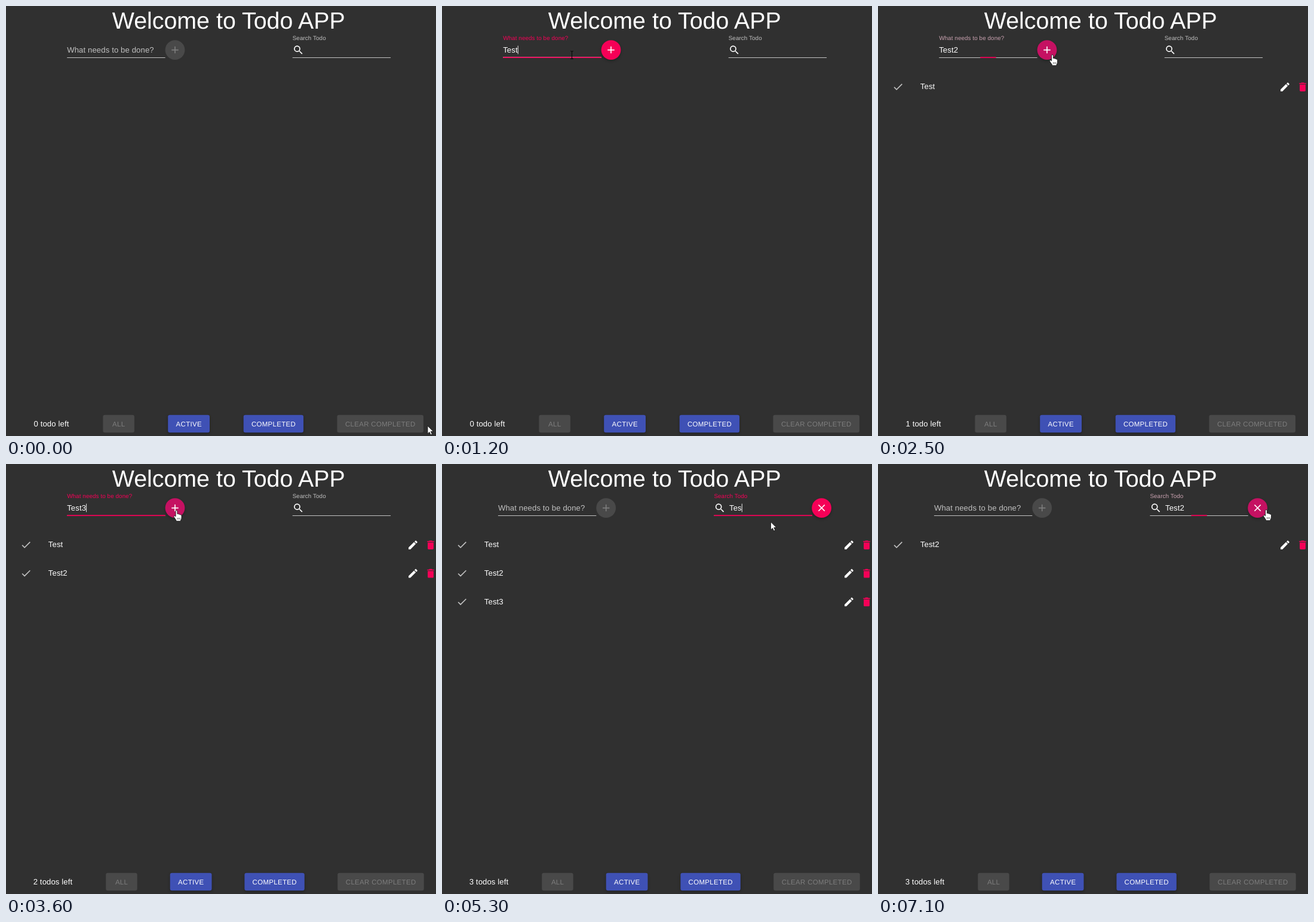
These frames come from a looping animation (720 by 720 pixels, 7200 ms). An HTML page:

```html
<!DOCTYPE html>
<html lang="en">
<head>
<meta charset="utf-8">
<title>Todo</title>
<style>
  html, body { margin: 0; width: 100%; height: 100%; overflow: hidden; background: #303030; }
  svg { display: block; width: 720px; height: 720px; }
  text {
    font-family: "Liberation Sans", Arial, sans-serif;
    font-kerning: normal;
    text-rendering: geometricPrecision;
    white-space: pre;
  }
  .raised { filter: drop-shadow(0 2px 2px rgba(0, 0, 0, .3)); }
</style>
</head>
<body>
<svg id="stage" viewBox="0 0 720 720"></svg>
<script>
const LOOP = 7200, STEP = 100, SCALE = .82, BODY = 16 * SCALE;
const PINK = '#f50057', PINK_DARK = '#c51162', BLUE = '#3f51b5';
const SOFT = '#c1c1c1', OFF_BG = '#494949', OFF_FG = '#7d7d7d';
const FIELD_W = 164.4;

const ICONS = {
  check: 'M9 16.17L4.83 12l-1.42 1.41L9 19 21 7l-1.41-1.41z',
  add: 'M19 13h-6v6h-2v-6H5v-2h6V5h2v6h6v2z',
  close: 'M19 6.41L17.59 5 12 10.59 6.41 5 5 6.41 10.59 12 5 17.59 6.41 19 12 13.41 17.59 19 19 17.59 13.41 12z',
  edit: 'M3 17.25V21h3.75L17.81 9.94l-3.75-3.75zM20.71 7.04c.39-.39.39-1.02 0-1.41l-2.34-2.34c-.39-.39-1.02-.39-1.41 0l-1.83 1.83 3.75 3.75z',
  trash: 'M6 19c0 1.1.9 2 2 2h8c1.1 0 2-.9 2-2V7H6zM19 4h-3.5l-1-1h-5l-1 1H5v2h14z',
  search: 'M15.5 14h-.79l-.28-.27A6.5 6.5 0 1 0 13.73 14.43l.27.28v.79l5 4.99L20.49 19zM9.5 14a4.5 4.5 0 1 1 0-9 4.5 4.5 0 0 1 0 9z'
};

// Timeline: [time, value]
const TODO_KEYS = [[0, ''], [800, 'T'], [900, 'Te'], [1000, 'Tes'], [1100, 'Test'], [1400, ''],
  [1900, 'T'], [2000, 'Te'], [2100, 'Test'], [2200, 'Test2'], [2600, ''],
  [3000, 'T'], [3100, 'Te'], [3200, 'Test'], [3300, 'Test3'], [3800, '']];
const SEARCH_KEYS = [[0, ''], [4800, 'T'], [5000, 'Te'], [5200, 'Tes'], [5500, 'Test'], [5900, 'Test2']];
const ADDED = [[1400, 'Test'], [2600, 'Test2'], [3800, 'Test3']];
const TODO_FOCUS = [[566, 1300], [1760, 2400], [2850, 3700]];
const TODO_SHRINK = [[566, 1400], [1760, 2600], [2850, 3800]];
const SEARCH_FOCUS = [[4450, 7000]];
const POINTER = [[0, 706, 703], [500, 147, 84], [1100, 147, 84], [1300, 288, 80], [1400, 288, 80],
  [1700, 242, 87.5], [2150, 242, 87.5], [2400, 292, 82], [2600, 292, 82], [2800, 220, 82],
  [3300, 220, 82], [3600, 285.5, 78], [3900, 285.5, 78], [4400, 560, 78], [4500, 560, 78],
  [4700, 550.5, 97], [6700, 550.5, 97], [7000, 650, 77]];

const lerp = (a, b, k) => a + (b - a) * k;
const last = (steps, t) => steps.filter(s => s[0] <= t).pop();

// cubic-bezier(0, 0, .2, 1)
function easeOut(p) {
  if (p <= 0) return 0;
  if (p >= 1) return 1;
  let lo = 0, hi = 1;
  for (let i = 0; i < 24; i++) {
    const s = (lo + hi) / 2;
    if (.6 * s * s * (1 - s) + s ** 3 < p) lo = s; else hi = s;
  }
  return lo * lo * (3 - 2 * lo);
}

// 0..1 level of a 200 ms transition that is on during each span
function level(spans, t) {
  const span = last(spans, t);
  if (!span) return 0;
  const [on, off] = span;
  return t < off ? easeOut((t - on) / 200) : 1 - easeOut((t - off) / 200);
}

function mix(k) {
  const c = [[193, 245], [193, 0], [193, 87]].map(([a, b]) => Math.round(lerp(a, b, k)));
  return `rgb(${c})`;
}

function pointerAt(t) {
  const i = POINTER.findIndex(p => p[0] > t);
  if (i < 0) return POINTER[POINTER.length - 1].slice(1);
  const [t0, x0, y0] = POINTER[i - 1], [t1, x1, y1] = POINTER[i];
  let k = (t - t0) / (t1 - t0);
  k = k * k * (3 - 2 * k);
  return [lerp(x0, x1, k), lerp(y0, y1, k)];
}

const ruler = document.createElement('canvas').getContext('2d');
ruler.font = '100px "Liberation Sans", Arial, sans-serif';
const textWidth = s => ruler.measureText(s).width * BODY / 100 + s.length * BODY * .00938;

const rect = (x, y, w, h, fill, extra = '') =>
  `<rect x="${x}" y="${y}" width="${w}" height="${h}" fill="${fill}" ${extra}/>`;
const text = (s, x, y, size = BODY, fill = '#fff', spacing = .00938, anchor = 'start') =>
  `<text x="${x}" y="${y}" font-size="${size}" fill="${fill}" letter-spacing="${size * spacing}" text-anchor="${anchor}">${s}</text>`;
const icon = (name, x, y, fill = '#fff') =>
  `<path d="${ICONS[name]}" transform="translate(${x} ${y}) scale(${SCALE})" fill="${fill}" fill-rule="evenodd"/>`;

function button(label, x, w, active) {
  return rect(x, 684.7, w, 29.5, active ? BLUE : OFF_BG, `rx="3.3" ${active ? 'class="raised"' : ''}`) +
    text(label, x + w / 2 + .15, 703.6, 14 * SCALE, active ? '#fff' : OFF_FG, .02857, 'middle');
}

function fab(name, x, enabled, hover) {
  const fill = !enabled ? OFF_BG : hover ? PINK_DARK : PINK;
  return `<circle cx="${x}" cy="73.6" r="16.4" fill="${fill}" ${enabled ? 'class="raised"' : ''}/>` +
    icon(name, x - 12 * SCALE, 73.6 - 12 * SCALE, enabled ? '#fff' : OFF_FG);
}

function field({ x, pad, label, value, shrink, focus, hover, caret }) {
  let out = text(label, x, lerp(77.8, 56.7, shrink), BODY * lerp(1, .75, shrink), mix(focus));
  out += hover ? rect(x, 85.3, FIELD_W, 1.7, '#fff') : rect(x, 86, FIELD_W, 1, SOFT);
  if (focus > 0) out += rect(x + FIELD_W * (1 - focus) / 2, 85.3, FIELD_W * focus, 1.8, PINK);
  if (value) out += text(value, x + pad, 77.8);
  if (caret) out += rect(x + pad + textWidth(value), 66.5, .9, 14, '#fff');
  return out;
}

function row(label, i) {
  const y = i * 47.7;
  return icon('check', 23.7, 125.4 + y, SOFT) + text(label, 70.8, 139.3 + y) +
    icon('edit', 671.6, 125.7 + y) + icon('trash', 701.2, 125.7 + y, PINK);
}

const SHAPES = {
  arrow: '<path d="M0 0V13.2L3 10.4 5.1 15.1 7.4 14.1 5.3 9.5H9.4Z" fill="#fff" stroke="#111" stroke-width=".8"/>',
  beam: '<path d="M-2.4-6.5Q0-6.5 0-5.2 0-6.5 2.4-6.5M0-5.5V5.5M-2.4 6.5Q0 6.5 0 5.2 0 6.5 2.4 6.5" fill="none" stroke="#080808" stroke-width="1.1"/>',
  hand: '<path d="M-1.4 1Q-1.4-.5 0-.5T1.4 1V5.6Q3.3 4.9 3.9 6.2 5.7 5.6 6.2 7 8.4 6.5 8.5 8.6V12Q8.5 14.5 7 16V17.7H-.6V16.2L-4.4 10.5Q-5 9.2-3.8 8.7-2.7 8.4-1.4 10Z" fill="#fff" stroke="#111" stroke-width=".8"/><path d="M1.5 12V15M3.6 12V15M5.7 12V15" stroke="#333" stroke-width=".7"/>'
};

function caretOn(spans, keys, t) {
  const span = last(spans, t);
  if (!span || t >= span[1]) return false;
  const since = Math.max(span[0], last(keys, t)[0]);
  return Math.floor((t - since) / 500) % 2 === 0;
}

function draw(t) {
  const todo = last(TODO_KEYS, t)[1], query = last(SEARCH_KEYS, t)[1];
  const items = ADDED.filter(a => a[0] <= t).map(a => a[1]);
  const left = query ? 93.9 : 102.2, right = query ? 455.4 : 479.7;
  const addX = left + 180.8, closeX = right + 180.2;

  const [px, py] = pointerAt(t);
  const overField = x => px > x && px < x + FIELD_W && py > 60 && py < 89;
  const overFab = x => Math.hypot(px - x, py - 73.6) < 16.5;
  const hoverAdd = overFab(addX), hoverClose = overFab(closeX);
  const shape = (todo && hoverAdd) || (query && hoverClose) ? 'hand'
    : overField(left) || overField(right) ? 'beam' : 'arrow';

  const n = items.length, many = n > 1;
  const bar = many ? [167.2, 274.7, 399.4, 555.2] : [162.4, 271.2, 397.7, 554.4];

  return rect(0, 0, 720, 720, '#303030') +
    text('Welcome to Todo APP', 177.7, 38, 48 * SCALE, '#fff', 0) +
    field({
      x: left, pad: 0, label: 'What needs to be done?', value: todo,
      shrink: level(TODO_SHRINK, t), focus: level(TODO_FOCUS, t),
      hover: overField(left), caret: caretOn(TODO_FOCUS, TODO_KEYS, t)
    }) +
    fab('add', addX, !!todo, hoverAdd) +
    field({
      x: right, pad: 25.6, label: 'Search Todo', value: query,
      shrink: 1, focus: level(SEARCH_FOCUS, t),
      hover: overField(right), caret: caretOn(SEARCH_FOCUS, SEARCH_KEYS, t)
    }) +
    icon('search', right, 63.9) +
    (query ? fab('close', closeX, true, hoverClose) : '') +
    items.filter(s => s.includes(query)).map(row).join('') +
    text(`${n} todo${many ? 's' : ''} left`, many ? 45.7 : 46.5, 703.6) +
    button('ALL', bar[0], 52.5) +
    button('ACTIVE', bar[1], 69.8, true) +
    button('COMPLETED', bar[2], 100.4, true) +
    button('CLEAR COMPLETED', bar[3], 144.6) +
    `<g transform="translate(${px} ${py})">${SHAPES[shape]}</g>`;
}

const stage = document.getElementById('stage');
const start = performance.now();
let shown = -1;

function tick() {
  const t = Math.floor((performance.now() - start) % LOOP / STEP) * STEP;
  if (t !== shown) stage.innerHTML = draw(shown = t);
  requestAnimationFrame(tick);
}
tick();
</script>
</body>
</html>
```
